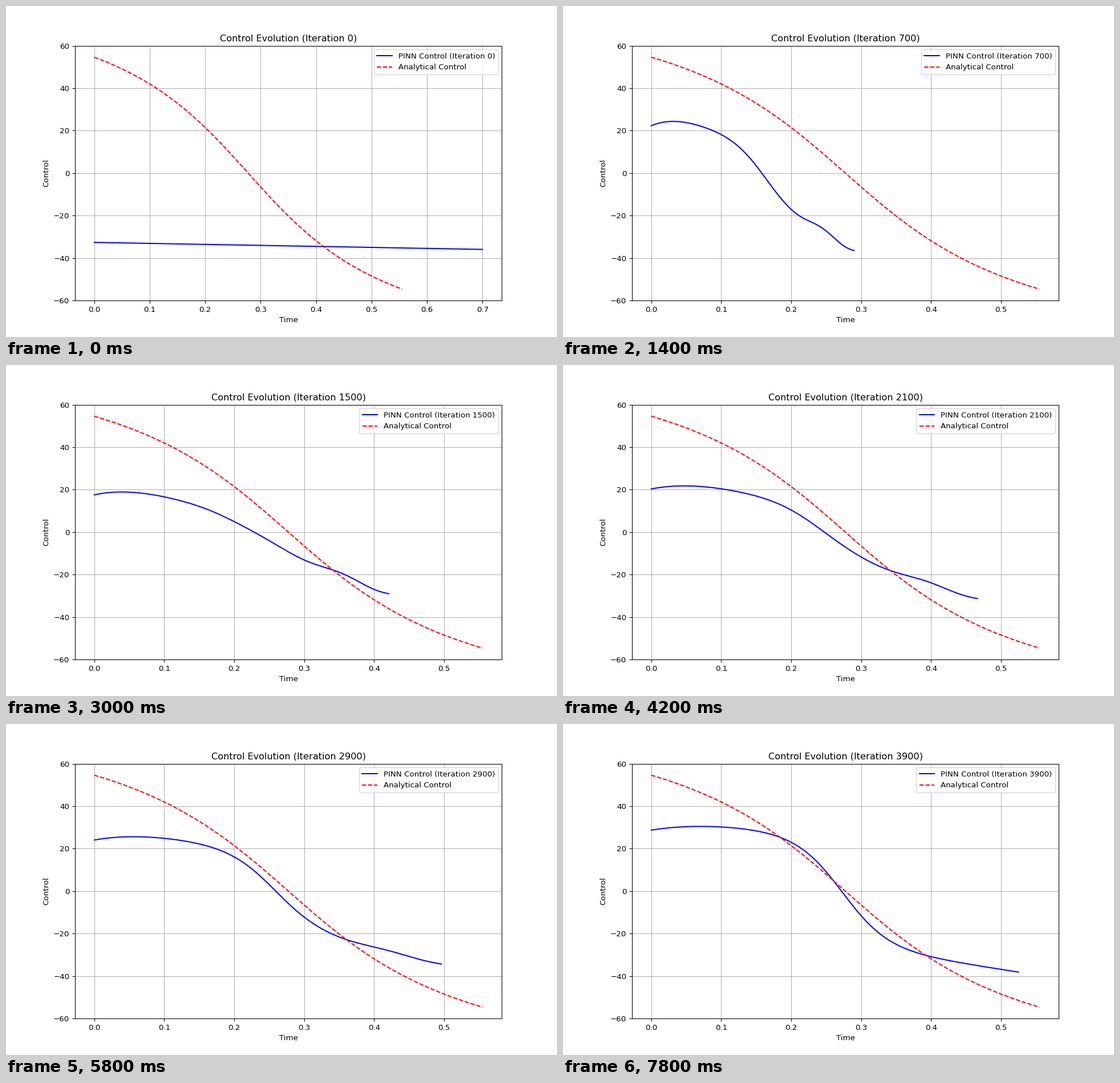
These frames come from a looping animation (966x580 px, 8000 ms). A matplotlib script:

```python
import numpy as np
import matplotlib.pyplot as plt
from matplotlib.animation import FuncAnimation

FRAMES, INTERVAL, STEP = 40, 200, 100
T_STAR = 0.555  # final time of the analytical solution
S = np.linspace(0, 1, 200)  # time as a fraction of the final time


def shape(mid, slope, level=0.4, drop=0, width=1, dip=0, ripple=0):
    """Falling line with a tanh drop at mid, a dip at the start, a ripple at the end."""
    x = S - mid
    return (level - slope * x - drop * np.tanh(x / width) - dip * np.exp(-S / 0.2)
            - ripple * S ** 3 * np.sin(8 * np.pi * (S - 0.89)))


# (iteration, final time, control)
STAGES = [
    (0, 0.700, shape(0.50, 3.3, level=-34.25)),
    (700, 0.290, shape(0.55, 58, drop=10, width=0.12, dip=20, ripple=1.6)),
    (1500, 0.421, shape(0.55, 53, drop=5, width=0.15, dip=17, ripple=1.2)),
    (3900, 0.525, shape(0.52, 27, drop=25.5, width=0.125, dip=11.2)),
]


def control(n):
    """Times and values of the learned control after n iterations."""
    k = max(i for i, stage in enumerate(STAGES[:-1]) if stage[0] <= n)
    (n_a, tf_a, a), (n_b, tf_b, b) = STAGES[k:k + 2]
    f = (n - n_a) / (n_b - n_a)
    if k < 2:  # fast early learning that settles
        w_time = w_shape = 1 - (1 - f) ** 2.1
    else:  # slow refinement
        w_time, w_shape = f ** 0.6, f
    return S * (tf_a + (tf_b - tf_a) * w_time), a + (b - a) * w_shape


t_exact = S * T_STAR
u_exact = np.degrees(np.arctan(5.07 * (T_STAR / 2 - t_exact)))

fig, ax = plt.subplots(figsize=(10, 6.0042), dpi=96.6)  # 966 x 580 px


def draw(frame):
    n = frame * STEP
    ax.clear()
    ax.plot(*control(n), "b-", label=f"PINN Control (Iteration {n})")
    ax.plot(t_exact, u_exact, "r--", label="Analytical Control")
    ax.set_title(f"Control Evolution (Iteration {n})")
    ax.set_xlabel("Time")
    ax.set_ylabel("Control")
    ax.set_ylim(-60, 60)
    ax.grid(True)
    ax.legend(loc="upper right")
    return ax.lines


anim = FuncAnimation(fig, draw, frames=FRAMES, interval=INTERVAL,
                     init_func=lambda: draw(0), repeat=True, repeat_delay=0)
plt.show()
```
